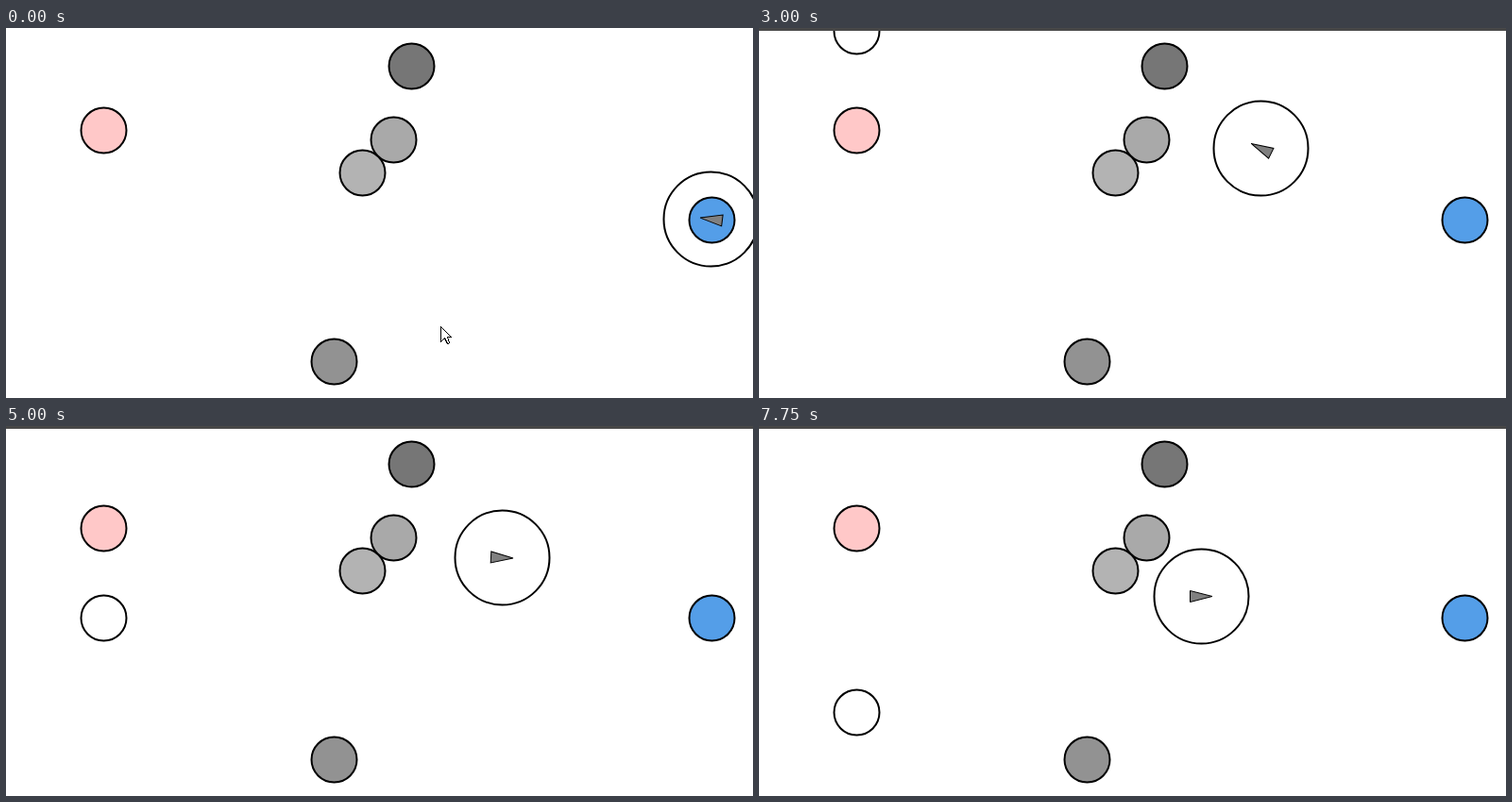
An HTML page that plays this animation: 791x392 px, repeating every 8 s.

```html
<!DOCTYPE html>
<html lang="en">
<head>
<meta charset="utf-8">
<title>Bouncing agent</title>
<style>
  html, body { margin: 0; width: 100%; height: 100%; overflow: hidden; background: #fff; }
  svg { display: block; width: 791px; height: 392px; }
  .ring { stroke: #000; stroke-width: 2; }
</style>
</head>
<body>
<svg viewBox="0 0 791 392">
  <g class="ring">
    <circle cx="103.5" cy="108.5" r="24" fill="#ffc8c8"/>
    <circle cx="429.5" cy="40.5" r="24" fill="#767676"/>
    <circle cx="410.5" cy="118.5" r="24" fill="#a9a9a9"/>
    <circle cx="377.5" cy="153.5" r="24" fill="#b3b3b3"/>
    <circle cx="347.5" cy="353.5" r="24" fill="#929292"/>
    <circle cx="747.5" cy="203.5" r="24" fill="#549ee8"/>
    <circle id="marker" cx="103.5" r="24" fill="none"/>
  </g>
  <g id="agent">
    <circle class="ring" r="50" fill="none"/>
    <path id="arrow" d="M11.5 0L-12 -6V6Z" fill="#808080" stroke="#000"/>
  </g>
  <path id="cursor" d="M460.5 316.5V332.5L464.5 328.5L467.5 334.5H468.5L469.5 333.5L467.5 327.5H471.5Z"
        fill="#fff" stroke="#000" shape-rendering="crispEdges"/>
  <rect id="bar" width="791" height="3" fill="#484848"/>
</svg>
<script>
  const LOOP = 8000, FIRST = 500, STEP = 250;
  const CURSOR_GONE = 1250;
  const DROPS = [2500, 3500, 3750, 7250]; // marker falls 100px at each time

  // Where the agent bounces, and how far it swings out before the next bounce
  const bounces = [
    { step: 7, x: 472, y: 161, out: 60.6, sag: 0 },
    { step: 12.5, x: 487, y: 114, out: 71.5, sag: -7.9 },
    { step: 18, x: 482, y: 138, out: 80.6, sag: -6.3 },
    { step: 24, x: 469, y: 165, out: 80, sag: -6 },
    { step: 30, x: 468, y: 180, out: 80, sag: -5 },
    { step: 36, x: 468, y: 200 }
  ];

  const $ = id => document.getElementById(id);
  const [agent, arrow, marker, cursor, bar] =
    ["agent", "arrow", "marker", "cursor", "bar"].map($);
  const degrees = (dx, dy) => Math.atan2(dy, dx) * 180 / Math.PI;

  // Gathers speed from rest on a straight line towards the first bounce
  function approach(step) {
    const n = Math.max(0, step - 1);
    const run = 66.5 * (Math.hypot(n, 2.31) - 2.31);
    return { x: 746 - run, y: 202 - run * 0.15, angle: 187 };
  }

  // Parabola between two bounces; the arrow follows the velocity
  function hop(a, b, step) {
    const u = (step - a.step) / (b.step - a.step);
    const bow = 4 * u * (1 - u), slope = 4 - 8 * u;
    const dx = b.x - a.x, dy = b.y - a.y;
    return {
      x: a.x + dx * u + a.out * bow,
      y: a.y + dy * u + a.sag * bow,
      angle: degrees(dx + a.out * slope, dy + a.sag * slope)
    };
  }

  function pose(step) {
    const next = bounces.findIndex(b => b.step > step);
    return next ? hop(bounces[next - 1], bounces[next], step) : approach(step);
  }

  function draw(t) {
    const step = Math.max(0, Math.floor((t - FIRST) / STEP) + 1);
    const { x, y, angle } = pose(step);
    agent.setAttribute("transform", `translate(${Math.round(x) + 0.5} ${Math.round(y) + 0.5})`);
    arrow.setAttribute("transform", `rotate(${angle})`);
    marker.setAttribute("cy", 100 * DROPS.filter(d => d <= t).length - 96.5);
    cursor.setAttribute("visibility", t < CURSOR_GONE ? "visible" : "hidden");
    bar.setAttribute("visibility", t < FIRST ? "hidden" : "visible");
  }

  const start = performance.now();
  function tick() {
    draw((performance.now() - start) % LOOP);
    requestAnimationFrame(tick);
  }
  tick();
</script>
</body>
</html>
```
